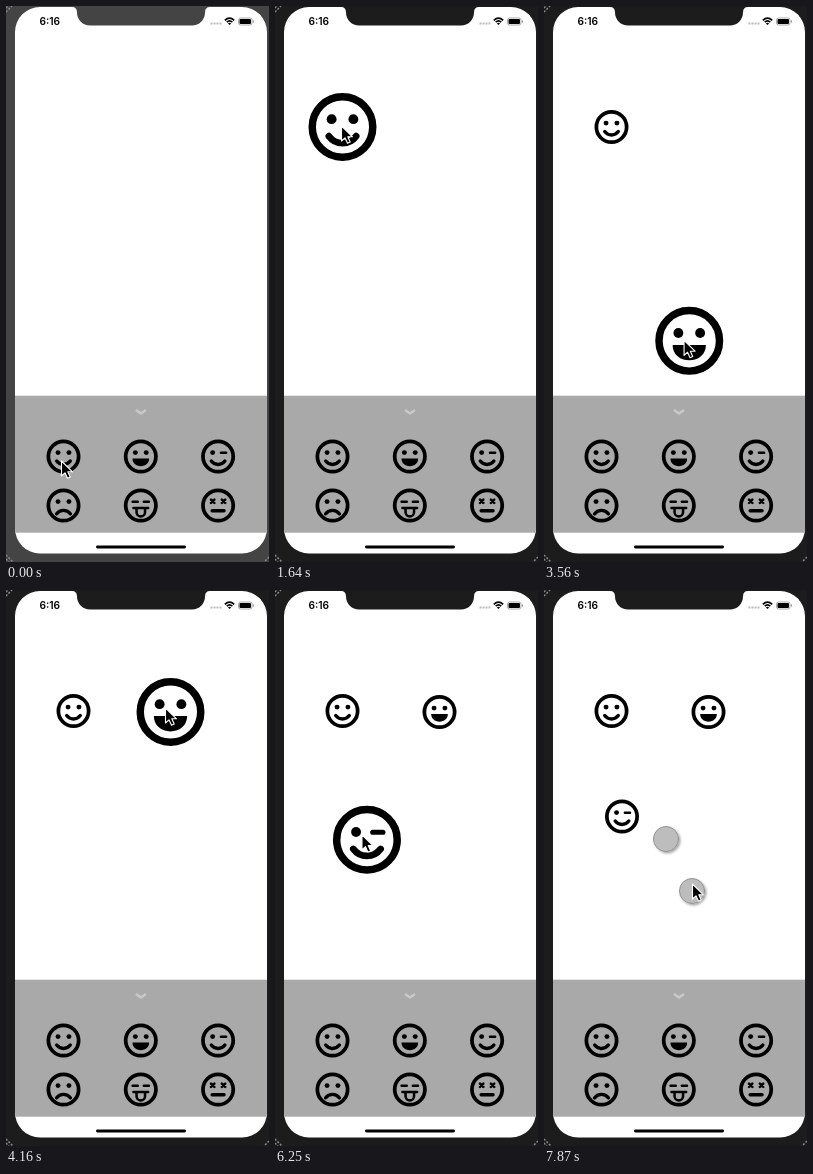
These frames come from a looping animation (263 px wide and 556 px high, 8 s). An HTML page:

```html
<!DOCTYPE html>
<html lang="en">
<head>
<meta charset="utf-8">
<title>Emoji stickers</title>
<style>
html, body { margin: 0; width: 100%; height: 100%; overflow: hidden; }
svg { display: block; width: 100vw; height: 100vh; }
.line { fill: none; stroke: #000; stroke-width: 2; stroke-linecap: round; }
.thin { stroke-width: 1.5; }
text { font: 600 10.2px Inter, "Liberation Sans", sans-serif; }
</style>
</head>
<body>
<svg viewBox="0 0 263 556">
  <defs>
    <!-- Faces are drawn on a circle of radius 10 -->
    <circle id="ring" class="line" r="8.9" style="stroke-width: 2.2"/>
    <circle id="eye" r="1.45" cy="-2.3"/>
    <path id="wink" class="line thin" d="M-1.5 -2.2H1.5"/>
    <path id="cross" class="line thin" d="M-1 -3.5L1 -1.5M1 -3.5L-1 -1.5"/>
    <path id="grin" class="line" d="M-4 2.7C-2 5.4 2 5.4 4 2.7"/>
    <g id="smile"><use href="#ring"/><use href="#eye" x="-3.2"/><use href="#eye" x="3.2"/><use href="#grin"/></g>
    <g id="laugh"><use href="#ring"/><use href="#eye" x="-3.2"/><use href="#eye" x="3.2"/>
      <path d="M-4.9 1.2H4.9C4.9 3.9 2.8 5.7 0 5.7S-4.9 3.9 -4.9 1.2Z"/></g>
    <g id="winking"><use href="#ring"/><use href="#eye" x="-3.2"/><use href="#wink" x="3.2"/><use href="#grin"/></g>
    <g id="frown"><use href="#ring"/><use href="#eye" x="-3.2"/><use href="#eye" x="3.2"/>
      <path class="line" d="M-4 4.9C-2 2.2 2 2.2 4 4.9"/></g>
    <g id="tongue"><use href="#ring"/><use href="#wink" x="-3.3"/><use href="#wink" x="3.3"/>
      <path class="line thin" d="M-4.3 1.5H4.3M-2.5 1.5V3.9A2.5 2.5 0 0 0 2.5 3.9V1.5"/></g>
    <g id="dizzy"><use href="#ring"/><use href="#cross" x="-3.2"/><use href="#cross" x="3.2"/>
      <path class="line" d="M-3.5 3.1H3.5"/></g>
    <circle id="touch" r="12.5" fill="#bdbdbd" stroke="#929292" filter="url(#shadow)"/>
    <filter id="shadow" x="-50%" y="-50%" width="200%" height="200%">
      <feDropShadow dx="1.5" dy="1.5" stdDeviation="1" flood-opacity=".35"/>
    </filter>
    <path id="outline" d="M9 26A25 25 0 0 1 34 1H66Q71 1 71 6.5A13 13 0 0 0 84 19.5H186A13 13 0 0 0 199 6.5Q199 1 204 1H236A25 25 0 0 1 261 26V522.5A25 25 0 0 1 236 547.5H34A25 25 0 0 1 9 522.5Z"/>
    <clipPath id="screen"><use href="#outline"/></clipPath>
  </defs>

  <rect id="bezel" width="263" height="556"/>
  <path d="M0 2L2 0M0 6L6 0M0 553L3 556M0 549L7 556M263 551L258 556" stroke="#888" stroke-width="1.5" stroke-dasharray="2 1.5"/>
  <use href="#outline" fill="#fff"/>
  <g clip-path="url(#screen)"><rect x="9" y="389.7" width="252" height="137" fill="#a9a9a9"/></g>
  <path d="M130 404L135 407.5L140 404" fill="none" stroke="#c9c9c9" stroke-width="2.6"/>
  <rect x="90" y="539.6" width="90" height="2.9" rx="1.45"/>

  <text x="33.5" y="19">6:16</text>
  <path d="M204.5 17.5H216" stroke="#bbb" stroke-width="2" stroke-dasharray="2 1"/>
  <path d="M218.8 14.3Q223.5 10 228.2 14.3M220.7 16.2Q223.5 13.6 226.3 16.2" fill="none" stroke="#000" stroke-width="1.6"/>
  <path d="M221.9 17.4Q223.5 16 225.1 17.4L223.5 19Z"/>
  <rect x="232.5" y="12" width="13.5" height="7" rx="2" fill="none" stroke="#999" stroke-width=".8"/>
  <rect x="233.5" y="13" width="11.5" height="5" rx="1"/>
  <path d="M247.4 14.3V16.7" stroke="#999"/>

  <g id="tray"></g>
  <g id="stickers"></g>
  <use class="finger" href="#touch"/>
  <use class="finger" href="#touch"/>
  <g id="cursor">
    <path d="M-.5 -1V14L3 10.8L5.5 16.3L8.2 15.1L5.8 9.8H10.5Z" stroke="#fff" stroke-width="1.1" stroke-linejoin="round"/>
  </g>
</svg>
<script>
// Time advances in coarse steps, as in a screen capture.
const LOOP = 8000, FIRST_STEP = 1038, STEP = 148.3;
const SMALL = 17, BIG = 34;
const LIFT = 2, TRAVEL = 5, SHRINK = 2.2, PINCH = 41;

const faceNames = ["smile", "laugh", "winking", "frown", "tongue", "dizzy"];
const drags = [
  { slot: 0, grab: -1, release: 6, drop: [67.5, 121] },
  { slot: 1, grab: 15, release: 21, drop: [164.5, 122] },
  { slot: 2, grab: 31, release: 37, drop: [78, 226.5] }
];
const cursorStart = [56, 456];
const cursorMoves = [
  { from: -1, until: 4, to: [67, 121] },
  { from: 7, until: 11.7, to: [130, 453] },
  { from: 15, until: 20, to: [160, 119] },
  { from: 23, until: 27, to: [212, 508] },
  { from: 27, until: 29, to: [212, 451] },
  { from: 31, until: 36, to: [73, 222] },
  { from: PINCH, until: 46, to: [149, 295] }
];

const $ = id => document.getElementById(id);
const mix = (a, b, p) => a + (b - a) * p;
const mixPoint = (a, b, p) => a.map((v, i) => mix(v, b[i], p));
const slotCentre = i => [57.5 + i % 3 * 77.3, i < 3 ? 450.5 : 499.5];

function ease(from, until, step) {
  const p = Math.min(1, Math.max(0, (step - from) / (until - from)));
  return p * p * (3 - 2 * p);
}

function place(node, [x, y], radius = 10) {
  node.setAttribute("transform", `translate(${x} ${y}) scale(${radius / 10})`);
}

function show(node, visible) {
  node.setAttribute("visibility", visible ? "visible" : "hidden");
}

function addFace(parent, name) {
  const face = document.createElementNS("http://www.w3.org/2000/svg", "use");
  face.setAttribute("href", "#" + name);
  return parent.appendChild(face);
}

faceNames.forEach((name, i) => place(addFace($("tray"), name), slotCentre(i), SMALL));
for (const drag of drags) drag.face = addFace($("stickers"), faceNames[drag.slot]);
const fingers = document.querySelectorAll(".finger");

function drawSticker({ face, slot, grab, release, drop }, step) {
  const size = ease(grab, grab + LIFT, step) - ease(release, release + SHRINK, step);
  const centre = mixPoint(slotCentre(slot), drop, ease(grab, grab + TRAVEL, step));
  show(face, step > grab);
  place(face, centre, mix(SMALL, BIG, size));
}

function draw(now) {
  const step = Math.max(-1, Math.floor((now % LOOP - FIRST_STEP) / STEP));
  $("bezel").setAttribute("fill", step < 0 ? "#444" : "#1c1c1c");
  drags.forEach(drag => drawSticker(drag, step));

  const cursor = cursorMoves.reduce(
    (point, { from, until, to }) => mixPoint(point, to, ease(from, until, step)), cursorStart);
  place($("cursor"), cursor);

  // The second touch mirrors the first about the screen centre.
  const [x, y] = [cursor[0] - 1, cursor[1] + 6];
  place(fingers[0], [x, y]);
  place(fingers[1], [270 - x, 550 - y]);
  fingers.forEach(finger => show(finger, step >= PINCH));
}

const start = performance.now();
function tick() {
  draw(performance.now() - start);
  requestAnimationFrame(tick);
}
tick();
</script>
</body>
</html>
```
